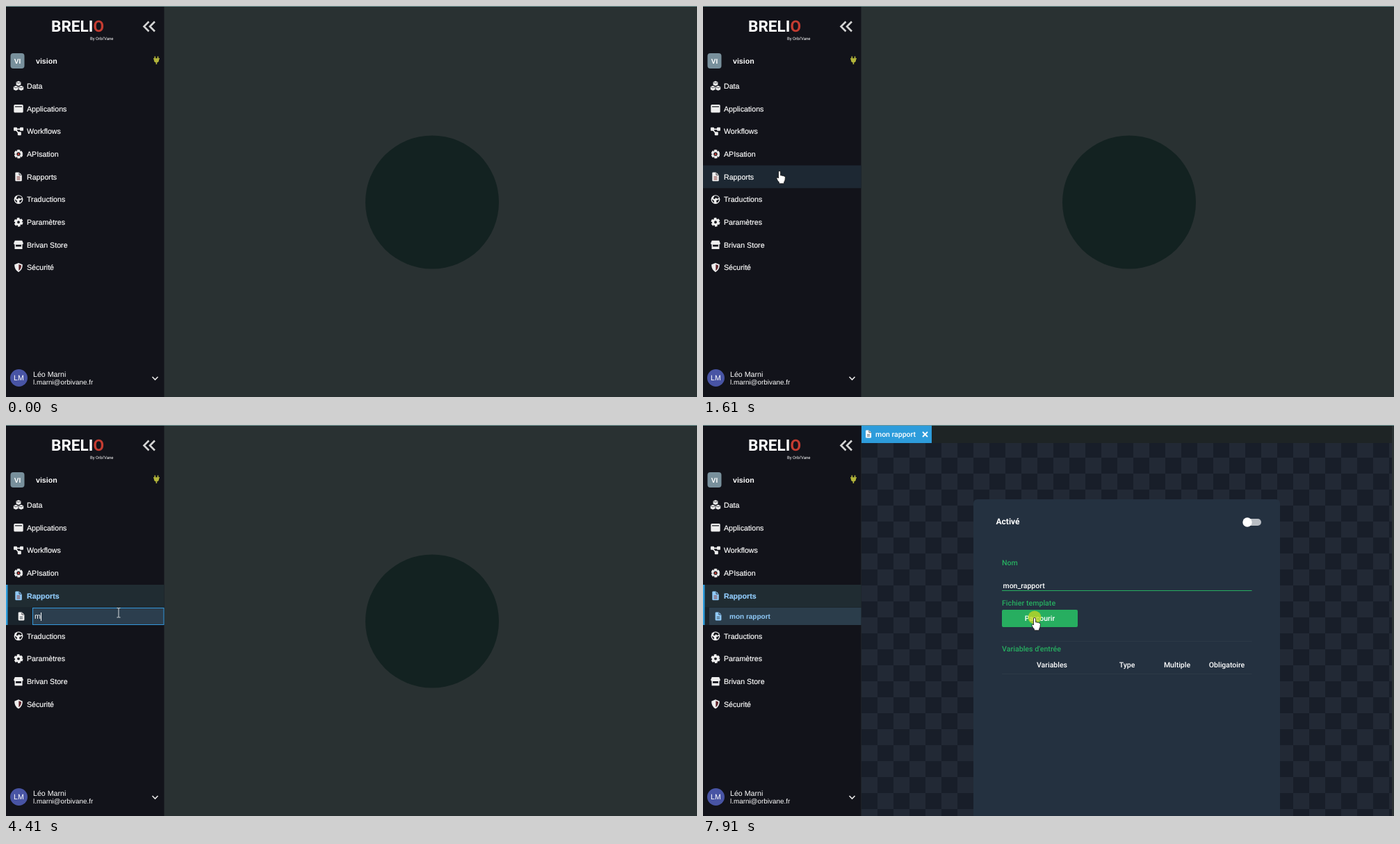
Recreate the animation shown at these times as an HTML page. Size 994 by 563 pixels, loop 7990 ms.

```html
<!DOCTYPE html>
<html lang="fr">
<head>
<meta charset="utf-8">
<title>Ajouter un rapport</title>
<style>
  html, body { margin: 0; width: 100%; height: 100%; overflow: hidden; background: #293132; }
  svg { display: block; }
  text { fill: #fff; font: 10.65px "Liberation Sans", Arial, sans-serif; white-space: pre; text-rendering: geometricPrecision; }
  #rows text { stroke: currentColor; stroke-width: .2px; }
  .bold { font-weight: 700; }
  .small { font-size: 9.87px; }
  .mid { text-anchor: middle; }
  .page text, .brand text { font-family: Roboto, sans-serif; }
  .page text { font-size: 10.5px; font-weight: 500; }
  .page .title { font-size: 12px; font-weight: 700; }
  .page .label { fill: #27ae60; font-size: 10.65px; }
  .brand .name { font-size: 22.6px; font-weight: 700; }
  .brand .by { font-size: 6px; }
  .active { color: #90caf9; }
  .active text { fill: #90caf9; }
  .hidden { display: none; }
</style>
</head>
<body>
<svg width="994" height="563" viewBox="0 0 994 563">
  <defs>
    <pattern id="checker" x="228" y="24" width="46" height="46" patternUnits="userSpaceOnUse">
      <rect width="46" height="46" fill="#222935"/>
      <path d="M0 0h23v46h23V23H0z" fill="#181e29"/>
    </pattern>
    <filter id="shadow" x="-10%" y="-20%" width="120%" height="150%">
      <feDropShadow dx="0" dy="1" stdDeviation="1.5" flood-color="#000" flood-opacity=".5"/>
    </filter>

    <g id="file">
      <path d="M-4.7-5.2q0-1.2 1.2-1.2H1L4.8-2.6V5.2q0 1.2-1.2 1.2h-7.1q-1.2 0-1.2-1.2z" fill="currentColor"/>
      <path d="M1-6.4v3.8h3.8" fill="none" stroke="#12131a" stroke-width=".8"/>
    </g>
    <g id="page-icon">
      <use href="#file"/>
      <path d="M-2.4 1h4.8M-2.4 3.5h4.8" stroke="#39444d"/>
    </g>

    <g id="i-data" fill="currentColor">
      <path id="cube" d="M0-7 3.4-5.5v4L0 0-3.4-1.500v-4z"/>
      <use href="#cube" x="-3.800" y="6.700"/>
      <use href="#cube" x="3.800" y="6.700"/>
      <path d="M-2.800-5 0-3.800 2.800-5M-6.600 1.700l2.800 1.200 2.800-1.200M1 1.700l2.800 1.200 2.800-1.200" fill="none" stroke="#12131a" stroke-width=".7"/>
    </g>
    <g id="i-apps">
      <rect x="-6.700" y="-5.800" width="13.400" height="11.600" rx="1.500" fill="currentColor"/>
      <path d="M-5-2.800H5" stroke="#12131a" stroke-width="1.200"/>
    </g>
    <g id="i-flow" fill="currentColor">
      <rect x="-7" y="-5.600" width="5" height="5" rx="1"/>
      <rect x="2" y="-5.600" width="5" height="5" rx="1"/>
      <rect x="-1.200" y=".8" width="5" height="5" rx="1"/>
      <path d="M-3-3.100h6M-3.600-2 .8 3.200" stroke="currentColor" stroke-width="1.600"/>
    </g>
    <g id="i-api">
      <circle r="5.200" fill="none" stroke="currentColor" stroke-width="2.200" stroke-dasharray="4.300 1.145"/>
      <circle r="3.700" fill="none" stroke="currentColor" stroke-width="2"/>
      <circle r="1.500" fill="#d0453c"/>
    </g>
    <g id="i-report">
      <use href="#file"/>
      <path d="M-2.400 0h4.800M-2.400 2h4.800M-2.400 4h4.800" stroke="#8d4a48"/>
    </g>
    <g id="i-globe">
      <circle r="6.400" fill="currentColor"/>
      <path d="M-1.500-5Q3-6 5-2.200L2.500-.8.6-2.600-1-.6l-2.400-.6zM-5-.2l2.600 1.800.4 3Q-5 3.400-5-.2zM1 1.600 5-.2Q5 3.400 1.800 4.800z" fill="#12131a"/>
    </g>
    <g id="i-gear">
      <circle r="5.300" fill="none" stroke="currentColor" stroke-width="2.400" stroke-dasharray="3.500 2.050"/>
      <circle r="3.500" fill="none" stroke="currentColor" stroke-width="3.200"/>
    </g>
    <g id="i-store">
      <path d="M-5.200-6.200H5.200l1.600 3.800q0 2.200-2 2.200h-9.600q-2 0-2-2.200z" fill="currentColor"/>
      <path d="M-4.700-.5v5.800h9.400v-5.800" fill="none" stroke="currentColor" stroke-width="1.600"/>
      <path d="M-5 4.200h10" stroke="currentColor" stroke-width="3.400"/>
    </g>
    <g id="i-shield">
      <path d="M0-6.600 5.800-4.300Q6 3 0 6.600-6 3-5.800-4.300z" fill="currentColor"/>
      <path d="M.4-4.700 4-3.200Q3.900 1.800.4 4.400z" fill="#5d2127"/>
    </g>

    <path id="arrow" d="M0 0V15.500L3.600 12.200 6 18l2.600-1.100-2.400-5.600h5z" fill="#fff" stroke="#111" stroke-width=".8"/>
    <path id="hand" d="M-1.500 2Q-1.400.5 0 .5T1.600 2v5q1.600-.6 2.300.4 1.600-.5 2.300.6 2.200-.4 2.200 1.800 0 5-1.800 6.800v2.200H-.6v-2Q-2.600 15-4 11.700q-.5-1.600.9-1.800 1-.1 1.600 1.100z" fill="#fff" stroke="#111" stroke-width=".8"/>
    <path id="beam" d="M-2.500-6.500H-.8L0-6 .8-6.500h1.700M0-6V6.500M-2.500 7H-.8L0 6.500.8 7h1.700" fill="none" stroke="#d5dadd"/>
  </defs>

  <rect width="994" height="563" fill="#293132"/>
  <circle id="mark" cx="613" cy="282.5" r="96" fill="#132221"/>

  <g id="page" class="page">
    <path d="M228 1h763v25H228z" fill="#1e2425"/>
    <path d="M228 26h763v537H228z" fill="url(#checker)"/>
    <path d="M228 1h101v25H228z" fill="#2d9cdb"/>
    <use href="#page-icon" transform="translate(238 13) scale(.85)" color="#fff"/>
    <text x="248" y="17">mon rapport</text>
    <path d="m316 10 7 7m0-7-7 7" stroke="#fff" stroke-width="1.8"/>

    <path d="M389 563V113q0-6 6-6h429q6 0 6 6v450z" fill="#243140"/>
    <text class="title" x="421.5" y="142.5">Activé</text>
    <rect x="779" y="135" width="24" height="10" rx="5" fill="#b9bec4"/>
    <circle cx="783" cy="140" r="6.7" fill="#fff"/>
    <text class="label" x="430" y="202">Nom</text>
    <text x="431.5" y="234.5">mon_rapport</text>
    <path d="M430 238.5H789.5" stroke="#27ae60"/>
    <text class="label" x="430" y="260">Fichier template</text>
    <rect x="430" y="266" width="109" height="25" rx="2" fill="#27ae60"/>
    <text class="mid" x="484.5" y="282">Parcourir</text>
    <path d="M430 311.5H789.5M430 358.5H789.5" stroke="#2c3946"/>
    <text class="label" x="430" y="326">Variables d'entrée</text>
    <g class="mid">
      <text x="502" y="349">Variables</text>
      <text x="610" y="349">Type</text>
      <text x="682" y="349">Multiple</text>
      <text x="753.5" y="349">Obligatoire</text>
    </g>
  </g>

  <path d="M0 0h227.5v563H0z" fill="#12131a"/>
  <path d="M0 .5h994" stroke="#6f9696"/>

  <g class="brand">
    <text class="name" x="65" y="37">BRELI<tspan fill="#c43c31">O</tspan></text>
    <text class="by" x="121" y="49">By Orbi'Vane</text>
  </g>
  <path d="m205.5 22.500-7 7 7 7m8.500-14-7 7 7 7" fill="none" stroke="#d4d4d4" stroke-width="2.600"/>
  <rect x="6.5" y="68" width="20" height="22" rx="4" fill="#78909c"/>
  <text class="mid bold" x="16.5" y="82.5" style="font-size:10px">VI</text>
  <text class="bold" x="43" y="82.5">vision</text>
  <g fill="#b3b53a" stroke="#b3b53a">
    <path d="M212 76h9M214.300 72.500v3.500m4.200-3.500v3.500m-2.100 4v4" stroke-width="1.600"/>
    <path d="M212.800 76h7.200v2q0 3.400-3.600 3.400t-3.600-3.400z" stroke="none"/>
  </g>

  <path id="hover" d="M0 0h227.5v32.7H0z" fill="#1d2833"/>
  <g id="selected">
    <path d="M0 230h227.5v32.7H0z" fill="#202c32"/>
    <path d="M0 262.7h227.5V288H0z" fill="#1a242c"/>
    <path d="M0 230h2.5v58H0z" fill="#2d9cdb"/>
  </g>
  <g id="rows"></g>

  <g id="editor">
    <use href="#page-icon" transform="translate(22 275.5) scale(.92)" color="#eee"/>
    <rect x="38.5" y="263.5" width="188.5" height="24" fill="#2c3e4e" stroke="#3498db"/>
    <text id="typed" x="41" y="279.3" style="font-size:10.75px"></text>
    <path id="caret" d="M.5 270v12" stroke="#fff"/>
  </g>
  <g id="child" class="active">
    <path d="M9 263h218.5v25H9z" fill="#2b3d4b"/>
    <use href="#page-icon" transform="translate(22 275.5) scale(.92)"/>
    <text class="bold" x="38" y="279" style="font-size:10px">mon rapport</text>
  </g>

  <circle cx="18.5" cy="535.5" r="12.5" fill="#4854a4"/>
  <text class="mid" x="18.5" y="539.3">LM</text>
  <text x="39" y="533.5">Léo Marni</text>
  <text class="small" x="39" y="545">l.marni@orbivane.fr</text>
  <path d="m210.5 534 4 4 4-4" fill="none" stroke="#e8e8e8" stroke-width="1.6"/>

  <g id="menu">
    <path d="M110 248h204v57H110z" fill="#101214" filter="url(#shadow)"/>
    <path id="option" d="M110 252h204v24H110z" fill="#1e2a33"/>
    <text class="small" x="134" y="267.3">Ajouter un modèle</text>
    <text class="small" x="134" y="291.8">Ajouter un répertoire</text>
  </g>

  <circle id="click" r="9.5" fill="#d3dc1e" opacity=".7"/>
  <use id="cursor"/>
</svg>
<script>
const LOOP = 7990, ROW = 32.7, TOP = 98.7, REPORTS = 4;
const MENU = 2250, EDIT = 3330, OPEN = 6270;
const LABEL = 'mon rapport';
const KEYS = [4410, 4560, 4810, 5040, 5190, 5270, 5500, 5650, 5800, 5960, 6030];
const CLICKS = [[2090, 2250], [3250, 3330], [7910, 7990]];

// Pointer steps: start time, shape, hotspot
const POINTER = [
  [220, 'arrow', 286, 487], [300, 'hand', 190, 372], [380, 'hand', 135, 312],
  [600, 'hand', 127, 285], [680, 'hand', 120, 252], [760, 'hand', 114, 198],
  [1070, 'hand', 113, 200], [1140, 'hand', 112, 205], [1220, 'hand', 112, 211],
  [1290, 'hand', 112, 217], [1370, 'hand', 112, 221], [1520, 'hand', 111, 228],
  [1600, 'hand', 110, 237], [1690, 'hand', 109.5, 247.5], [2620, 'hand', 132, 261],
  [2710, 'hand', 162, 269.5], [3330, 'beam', 162, 270], [6270, 'hand', 161, 269],
  [6750, 'arrow', 260, 260], [6830, 'arrow', 440, 238], [6900, 'arrow', 610, 217],
  [6980, 'arrow', 685, 208], [7130, 'arrow', 684, 203], [7210, 'arrow', 672, 206],
  [7290, 'arrow', 640, 218], [7360, 'arrow', 590, 238], [7440, 'arrow', 537, 257],
  [7520, 'hand', 502, 270], [7600, 'hand', 484, 275], [7680, 'hand', 477, 277]
];
const ITEMS = [
  ['data', 'Data'], ['apps', 'Applications'], ['flow', 'Workflows'],
  ['api', 'APIsation'], ['report', 'Rapports'], ['globe', 'Traductions'],
  ['gear', 'Paramètres'], ['store', 'Brivan Store'], ['shield', 'Sécurité']
];

const $ = id => document.getElementById(id);
const show = (id, on) => $(id).classList.toggle('hidden', !on);
const move = (el, x, y) => el.setAttribute('transform', `translate(${x} ${y})`);

$('rows').innerHTML = ITEMS.map(([icon, label]) =>
  `<g color="#eee"><use href="#i-${icon}" x="18"/><text x="30" y="3.8">${label}</text></g>`).join('');
const rows = [...$('rows').children];

function drawRows(t) {
  const editing = t >= EDIT;
  rows.forEach((row, i) => move(row, 0, TOP + ROW * (i + 0.5) + (editing && i > REPORTS ? 25.3 : 0)));
  rows[REPORTS].classList.toggle('active', editing);
  rows[REPORTS].lastChild.classList.toggle('bold', editing);
  show('selected', editing);
}

function drawPointer(t) {
  const step = POINTER.findLast(p => p[0] <= t);
  show('cursor', step);
  show('hover', step && t >= 300 && t < EDIT);
  show('click', CLICKS.some(([from, to]) => t >= from && t < to));
  if (!step) return;
  const [, shape, x, y] = step;
  $('cursor').setAttribute('href', '#' + shape);
  move($('cursor'), x, y);
  move($('click'), x, y);
  const row = t >= MENU ? REPORTS : Math.floor((y - TOP) / ROW);
  move($('hover'), 0, TOP + ROW * row);
}

function drawEditor(t) {
  const count = KEYS.filter(k => k <= t).length;
  $('typed').textContent = LABEL.slice(0, count);
  const width = count ? $('typed').getComputedTextLength() : 0;
  move($('caret'), Math.round(41 + width), 0);
  show('caret', count || t < 3860);
}

function draw(now) {
  const t = now % LOOP;
  show('menu', t >= MENU && t < EDIT);
  show('option', t >= 2620);
  show('editor', t >= EDIT && t < OPEN);
  show('child', t >= OPEN);
  show('page', t >= OPEN);
  show('mark', t < OPEN);
  drawRows(t);
  drawPointer(t);
  if (t >= EDIT && t < OPEN) drawEditor(t);
}

let start;
function tick(now) {
  start ??= now;
  draw(now - start);
  requestAnimationFrame(tick);
}
draw(0);
requestAnimationFrame(tick);
</script>
</body>
</html>
```
